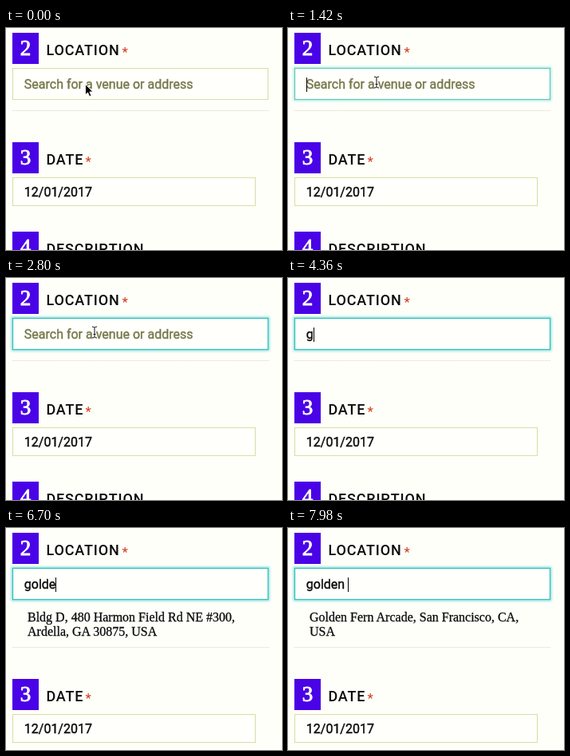
Animation of 346x278 px, one loop 8000 ms. Source, as an HTML page:

```html
<!DOCTYPE html>
<html lang="en">
<head>
<meta charset="utf-8">
<title>Event form</title>
<style>
html, body { margin: 0; width: 100%; height: 100%; overflow: hidden; background: #fffffa; }
svg { display: block; width: 346px; height: 278px; }
text { white-space: pre; }
.num { font: 27px "Liberation Serif", serif; fill: #fff; stroke: #fff; stroke-width: .9; text-anchor: middle; }
.head { font: 500 18px Roboto, sans-serif; letter-spacing: .85px; fill: #0c0c0c; }
.star { font: 17px Roboto, sans-serif; fill: #d63a1c; }
.field { font: 16px Roboto, sans-serif; fill: #0c0c0c; stroke: #0c0c0c; stroke-width: .4; }
.hint { fill: #77774a; stroke: #77774a; }
.tip { font: 16px "Liberation Serif", serif; fill: #0c0c0c; stroke: #0c0c0c; stroke-width: .3; }
.box { fill: #fffffc; stroke: #dcdca4; }
.rule { stroke: #d4d4c4; stroke-dasharray: 1 1; }
</style>
</head>
<body>
<svg viewBox="0 0 346 278" xmlns="http://www.w3.org/2000/svg">
  <defs>
    <filter id="blur" filterUnits="userSpaceOnUse" x="0" y="36" width="346" height="68">
      <feGaussianBlur stdDeviation="1.8"/>
    </filter>
  </defs>
  <rect width="346" height="278" fill="#fffffa"/>

  <rect x="8" y="6" width="33" height="39" fill="#4a02e6"/>
  <text class="num" x="24.5" y="33.5">2</text>
  <text class="head" x="50.4" y="34">LOCATION</text>
  <text class="star" x="145.5" y="35.5">*</text>
  <rect class="box" x="8.5" y="50.5" width="320" height="39"/>
  <rect id="glow" x="8.5" y="50.5" width="320" height="39" fill="none" stroke="#38c8c4" stroke-width="4" filter="url(#blur)"/>
  <rect x="9" y="51" width="319" height="38" fill="#fffffc"/>
  <rect id="ring" x="8.5" y="50.5" width="320" height="39" fill="none" stroke="#35c0be" stroke-width="1.3"/>
  <text id="hint" class="field hint" x="22.8" y="76">Search for a venue or address</text>
  <text id="typed" class="field" x="22.8" y="76"></text>
  <rect id="caret" y="62" width="1" height="18" fill="#000"/>
  <text id="tip1" class="tip" x="27" y="117"></text>
  <text id="tip2" class="tip" x="27" y="135"></text>

  <g id="below">
    <path class="rule" d="M8 103.5H330"/>
    <rect x="8" y="143" width="33" height="39" fill="#4a02e6"/>
    <text class="num" x="24.5" y="171">3</text>
    <text class="head" x="50.4" y="171">DATE</text>
    <text class="star" x="99.5" y="172.5">*</text>
    <rect class="box" x="8.5" y="187.5" width="304" height="35"/>
    <text class="field" x="22.8" y="211">12/01/2017</text>
    <rect x="8" y="255" width="33" height="39" fill="#4a02e6"/>
    <text class="num" x="24.5" y="283">4</text>
    <text class="head" x="50.4" y="283">DESCRIPTION</text>
  </g>

  <path id="arrow" d="M0 0V13.2L3 10.4L5.2 15.2L7.4 14.2L5.3 9.5H9.4Z" fill="#000" stroke="#fff" stroke-width=".9"/>
  <g id="beam" fill="none">
    <path d="M-3 -7Q0 -7 0 -5.5Q0 -7 3 -7M0 -5.5V5.5M-3 7Q0 7 0 5.5Q0 7 3 7" stroke="#fff" stroke-width="2.6"/>
    <path d="M-3 -7Q0 -7 0 -5.5Q0 -7 3 -7M0 -5.5V5.5M-3 7Q0 7 0 5.5Q0 7 3 7M-1.5 2.5H1.5" stroke="#111"/>
  </g>
</svg>
<script>
const LOOP = 8000;
const $ = id => document.getElementById(id);
const pen = document.createElement('canvas').getContext('2d');

const typing = [
  [0, ''], [4360, 'g'], [4700, 'go'], [5320, 'gol'],
  [5900, 'gold'], [6600, 'golde'], [7000, 'golden'], [7440, 'golden ']
];
const tips = [
  [0, []],
  [4520, ['27 Gorse Hill Ln, Wellmoor, TX 70518, USA']],
  [5460, ['826 31st St, Ember Beach, FL 30972, USA']],
  [6040, ['Gold Lantern Hall, Dunmere, CO, USA']],
  [6680, ['Bldg D, 480 Harmon Field Rd NE #300,', 'Ardella, GA 30875, USA']],
  [7160, ['Golden, CO, USA']],
  [7560, ['Golden Fern Arcade, San Francisco, CA,', 'USA']]
];
const shifts = [0, 28, 46];

const clamp = v => Math.min(1, Math.max(0, v));
const ramp = (t, a, b) => clamp((t - a) / (b - a));
const smooth = p => p * p * (3 - 2 * p);
const bend = (a, b, c, p) => (1 - p) ** 2 * a + 2 * p * (1 - p) * b + p * p * c;
const at = (list, t) => list.filter(e => e[0] <= t).pop()[1];
const show = (el, on) => el.setAttribute('visibility', on ? 'visible' : 'hidden');

function drawPointer(t) {
  const p = smooth(ramp(t, 140, 580));
  const place = `translate(${bend(99.5, 126, 111, p)} ${bend(70.5, 78, 68, p)})`;
  const isBeam = t >= 280;
  $('arrow').setAttribute('transform', place);
  $('beam').setAttribute('transform', place);
  show($('arrow'), !isBeam);
  show($('beam'), isBeam && t < 4220);
}

function drawField(t) {
  const focus = 1 - (1 - ramp(t, 940, 2400)) ** 2.4;
  $('ring').setAttribute('opacity', focus);
  $('glow').setAttribute('opacity', focus * 0.55);

  const word = at(typing, t);
  $('typed').textContent = word;
  show($('hint'), !word);

  pen.font = '16px Roboto, sans-serif';
  $('caret').setAttribute('x', Math.floor(23.2 + pen.measureText(word).width));
  const blink = t < 3000 ? ramp(t, 940, 1000) - ramp(t, 2640, 2780) : ramp(t, 3740, 3900);
  $('caret').setAttribute('opacity', blink);
}

function drawTips(t) {
  const lines = at(tips, t);
  $('tip1').textContent = lines[0] || '';
  $('tip2').textContent = lines[1] || '';
  $('below').setAttribute('transform', `translate(0 ${shifts[lines.length]})`);
}

function draw(t) {
  drawPointer(t);
  drawField(t);
  drawTips(t);
}

let start;
function tick(now) {
  start ??= now;
  draw((now - start) % LOOP);
  requestAnimationFrame(tick);
}
draw(0);
requestAnimationFrame(tick);
</script>
</body>
</html>
```
